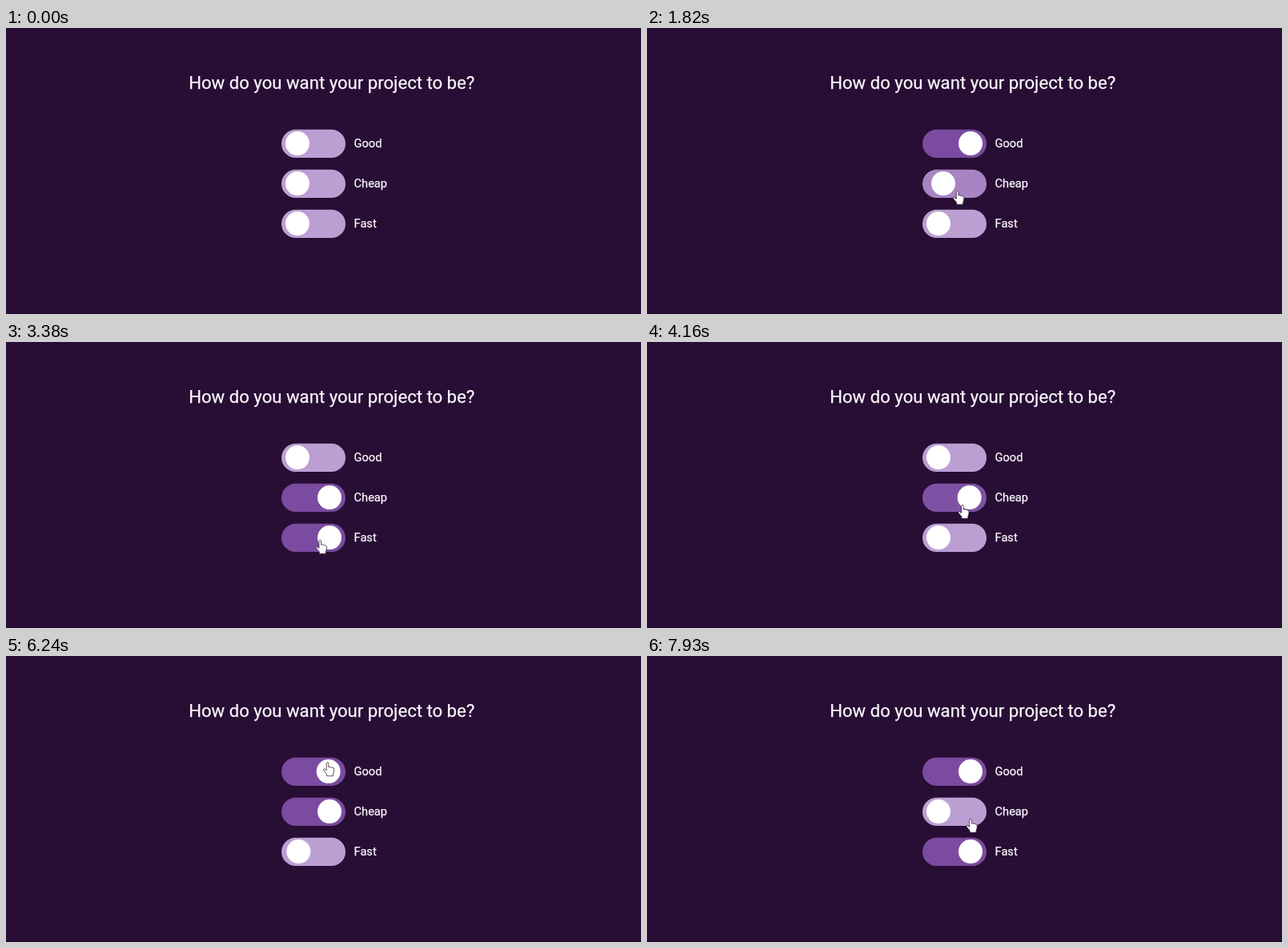
Recreate the animation shown at these times as an HTML page. Size 793x357 px, loop 8 s.

```html
<!DOCTYPE html>
<html lang="en">
<head>
<meta charset="utf-8">
<title>Project toggles</title>
<style>
  html, body { margin: 0; width: 100%; height: 100%; overflow: hidden; background: #280e34; }
  svg { display: block; width: 793px; height: 357px; }
  text { font: 14.6px Roboto, sans-serif; fill: #fbf7fd; stroke: #fbf7fd; stroke-width: .25px; }
  .title { font-size: 22.15px; }
</style>
</head>
<body>
<svg viewBox="0 0 793 357">
  <rect y="356" width="793" height="1" fill="#1d0a27"/>
  <text class="title" x="228.2" y="76.4">How do you want your project to be?</text>
  <g id="toggles"></g>
  <path id="hand" fill="#fff" stroke="#2b1b33" stroke-width=".8" stroke-linejoin="round"
    d="M-1.4 1.3a1.4 1.4 0 0 1 2.8 0V6q1.5-1 2.7.4q1.6-.7 2.6.6q2-.5 2.1 1.5V11q0 2-1.2 4v3H-1V15.5L-5.2 10.5q-.9-1.8 1-2L-1.4 10.5z"/>
</svg>
<script>
const LOOP = 8000, STEP = 130, SLIDE = 300;
const OFF = [187, 159, 211], ON = [122, 75, 160];
const GOOD = 0, CHEAP = 1, FAST = 2;

const toggles = [
  { name: 'Good', tipX: 386, tipY: 133, yields: FAST },
  { name: 'Cheap', tipX: 383, tipY: 203.5, yields: GOOD },
  { name: 'Fast', tipX: 383, tipY: 247.5, yields: CHEAP },
];
const clicks = [
  [1225, GOOD], [1775, CHEAP], [2400, FAST], [3050, CHEAP], [3550, FAST], [4150, CHEAP],
  [4754, FAST], [5200, CHEAP], [5950, GOOD], [6950, FAST], [8100, CHEAP],
];

const hand = document.getElementById('hand');
const group = document.getElementById('toggles');
const mix = (a, b, p) => a + (b - a) * p;
const clamp = p => Math.max(0, Math.min(1, p));

function add(tag, attrs) {
  const el = document.createElementNS('http://www.w3.org/2000/svg', tag);
  for (const key in attrs) el.setAttribute(key, attrs[key]);
  return group.appendChild(el);
}

toggles.forEach((toggle, i) => {
  const y = 126.8 + 50 * i;
  toggle.pill = add('rect', { x: 344, y, width: 80, height: 35.2, rx: 17.6 });
  toggle.knob = add('circle', { cy: y + 17.3, r: 15, fill: '#fff' });
  add('text', { x: 434.6, y: y + 21.8 }).textContent = toggle.name;
  toggle.flips = [];
});

// A click flips its toggle; if all three are then on, another one gives way.
for (const [time, index] of clicks) {
  const clicked = toggles[index];
  clicked.flips.push(time);
  if (toggles.every(({ flips }) => flips.length % 2)) toggles[clicked.yields].flips.push(time);
}

// The pointer appears, then visits each click, drifting slowly to the right.
const stops = [
  { time: 600, x: 378, y: 181 },
  ...clicks.map(([time, index]) => {
    const { tipX, tipY } = toggles[index];
    return { time, x: tipX + 0.0026 * time, y: tipY };
  }),
];

function drawToggle({ flips, pill, knob }, t) {
  const past = flips.filter(flip => flip <= t);
  const on = past.length % 2;
  const p = past.length ? clamp((t - past.at(-1)) / SLIDE) : 1;
  const eased = 1 - (1 - p) ** 2.3;
  const level = q => on ? q : 1 - q;
  knob.setAttribute('cx', mix(364, 404, level(p)));
  pill.setAttribute('fill', `rgb(${OFF.map((c, i) => Math.round(mix(c, ON[i], level(eased))))})`);
}

function drawHand(t) {
  const next = stops.findIndex(stop => stop.time > t);
  hand.style.display = next > 0 ? '' : 'none';
  if (next < 1) return;
  const from = stops[next - 1], to = stops[next];
  // Rest after a click, hop quickly, then wait for the next one.
  const p = clamp(((t - from.time) / (to.time - from.time) - .29) / .13);
  const s = p * p * (3 - 2 * p);
  hand.setAttribute('transform', `translate(${mix(from.x, to.x, s)} ${mix(from.y, to.y, s)}) scale(.93)`);
}

function draw() {
  const now = performance.now() % LOOP;
  const t = now - now % STEP;
  toggles.forEach(toggle => drawToggle(toggle, t));
  drawHand(t);
  requestAnimationFrame(draw);
}
draw();
</script>
</body>
</html>
```
